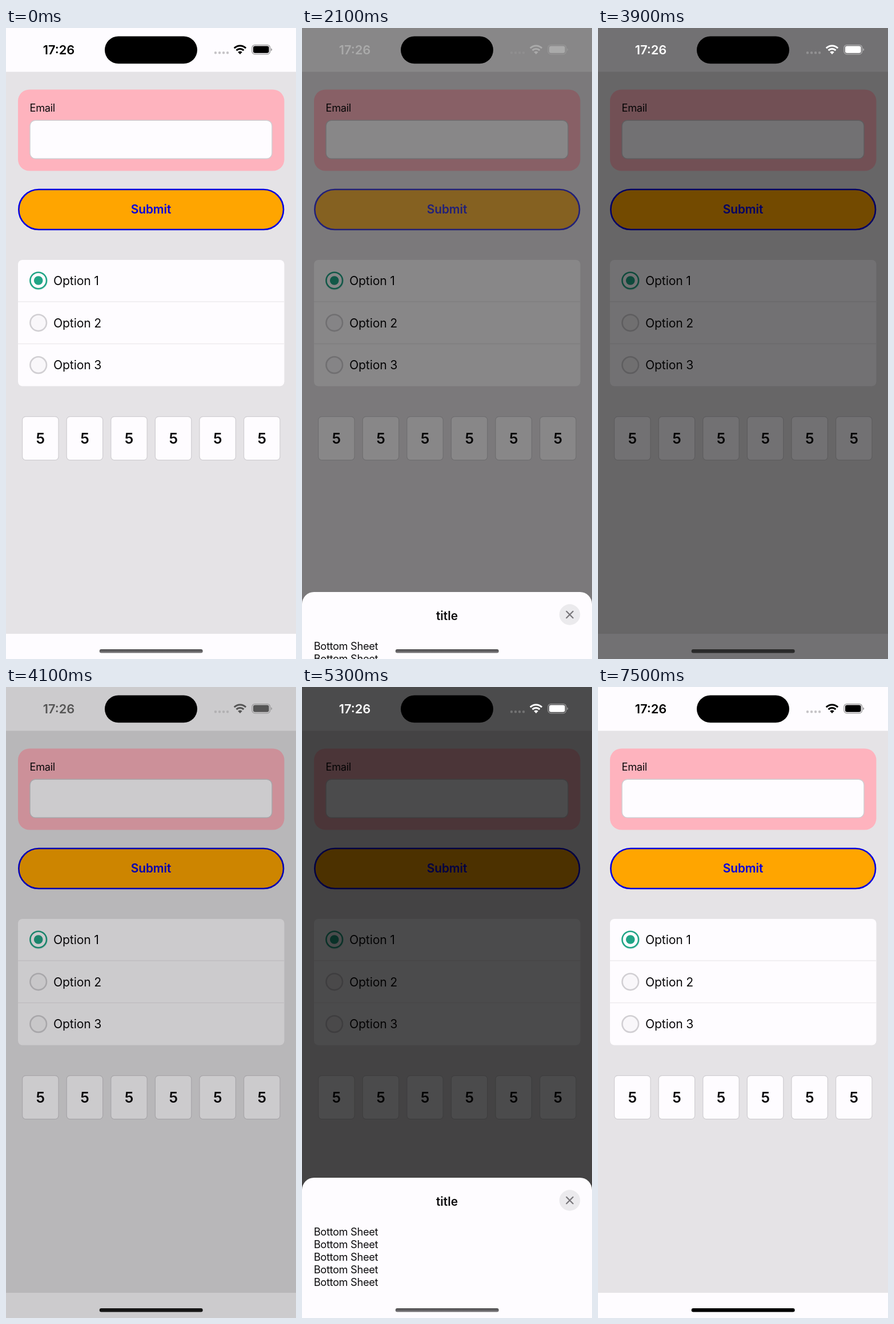
Write an HTML page that moves like this. It is 508x1102 px and loops after 7600 ms.

```html
<!DOCTYPE html>
<html lang="en">
<head>
<meta charset="utf-8">
<style>
html, body { margin: 0; width: 100%; height: 100%; overflow: hidden; background: #e5e3e6; }
svg { display: block; width: 100vw; height: 100vh; }
text { font-family: Inter, "Open Sans", sans-serif; fill: #0b0a0c; }
.small { font-size: 18.2px; letter-spacing: -.3px; }
.option { font-size: 21.2px; letter-spacing: -.15px; }
.bold { font-weight: 600; text-anchor: middle; }
.paper { fill: #fefcff; }
</style>
</head>
<body>
<svg viewBox="0 0 508 1102">
  <defs>
    <linearGradient id="grip" x2="0" y2="1">
      <stop stop-color="#4a494b"/><stop offset="1" stop-color="#7d7b7e"/>
    </linearGradient>
  </defs>

  <rect width="508" height="1102" fill="#e5e3e6"/>
  <rect class="paper" width="508" height="76.5"/>
  <rect class="paper" y="1058" width="508" height="44"/>

  <rect x="21" y="107.5" width="466.5" height="142" rx="20" fill="#feb3be"/>
  <text class="small" x="41.5" y="145.5">Email</text>
  <rect class="paper" x="42" y="161.3" width="424" height="67" rx="9.5" stroke="#cfcdd1" stroke-width="1.4"/>

  <g id="submit">
    <rect x="22.3" y="282" width="463.8" height="70" rx="35" fill="#ffa500" stroke="#0400e0" stroke-width="2.6"/>
    <text class="bold" x="254" y="324.3" font-size="20.8" style="fill:#0400e0">Submit</text>
  </g>

  <rect class="paper" x="21" y="405" width="466.5" height="220.5" rx="8"/>
  <path d="M21 478H487.5M21 551.5H487.5" stroke="#edebee" stroke-width="1.3"/>
  <g id="options"></g>
  <g id="digits"></g>

  <rect id="shade" width="508" height="1102"/>

  <g id="sheet">
    <path class="paper" d="M0 1140V878A21 21 0 0 1 21 857H487A21 21 0 0 1 508 878V1140Z"/>
    <text class="bold" x="254" y="905.7" font-size="20.8">title</text>
    <circle cx="469" cy="896.5" r="18.2" fill="#ebeaed"/>
    <path d="M463.3 890.8L474.7 902.2M474.7 890.8L463.3 902.2" stroke="#777579" stroke-width="2.2" stroke-linecap="round"/>
    <g id="lines"></g>
  </g>

  <g id="status">
    <text class="bold" x="92.5" y="45.7" font-size="21.8" style="fill:inherit">17:26</text>
    <path d="M367 43.3h.01M374.1 43.3h.01M381.1 43.3h.01M388.1 43.3h.01" stroke-width="4.4" stroke-linecap="round" opacity=".22"/>
    <path d="M399.8 35.3A14.4 14.4 0 0 1 420.2 35.3M403.6 39.1A9 9 0 0 1 416.4 39.1" fill="none" stroke-width="3"/>
    <path d="M410 46L406.2 42.1A5.4 5.4 0 0 1 413.8 42.1Z" stroke="none"/>
    <rect x="431" y="29.6" width="31.6" height="16.2" rx="5" fill="none" stroke-width="1.3" opacity=".42"/>
    <rect x="433" y="31.6" width="27.6" height="12.2" rx="3.3" stroke="none"/>
    <path d="M464.2 35.2Q466.2 36 466.2 37.7T464.2 40.2Z" stroke="none" opacity=".42"/>
  </g>
  <rect x="173" y="14.5" width="162" height="47.7" rx="23.8"/>
  <rect id="home" x="163.7" y="1085" width="181" height="6.5" rx="3.2"/>
</svg>
<script>
const $ = id => document.getElementById(id);
const list = (n, draw) => Array.from({ length: n }, (_, i) => draw(i)).join('');
const clamp = x => Math.min(1, Math.max(0, x));
const ramp = (t, from, to) => clamp((t - from) / (to - from));
const easeOut = x => 1 - (1 - x) ** 3;

$('options').innerHTML = list(3, i => {
  const y = 441 + 73.8 * i, on = i === 0;
  return (on ? `<circle cx="57" cy="${y + 1}" r="16" fill="#22a585" opacity=".15"/>` : '') +
    `<circle cx="56.7" cy="${y}" r="14.3" fill="${on ? '#fefcff' : '#f9f7fa'}"
      stroke="${on ? '#21a586' : '#d1cfd3'}" stroke-width="2.6"/>` +
    (on ? `<circle cx="56.7" cy="${y}" r="7.8" fill="#21a586"/>` : '') +
    `<text class="option" x="83" y="${y + 7.8}">Option ${i + 1}</text>`;
});
$('digits').innerHTML = list(6, i => {
  const x = 28.6 + 77.6 * i;
  return `<rect class="paper" x="${x}" y="678.6" width="63.4" height="76" rx="6" stroke="#cfcdd1" stroke-width="1.2"/>
    <text class="bold" x="${x + 31.8}" y="726" font-size="25.5">5</text>`;
});
$('lines').innerHTML = list(5, i => `<text class="small" x="20.7" y="${957.7 + 22 * i}">Bottom Sheet</text>`);

// Each cycle: press the button, raise the sheet, then drop it and fade the shade.
const cycles = [
  { press: 1800, full: 1900, open: 2000, close: 3900 },
  { press: 4600, full: 4800, open: 4900, close: 7100 }
];

function render(t) {
  const c = cycles[t < 4500 ? 0 : 1];
  const closing = t >= c.close;
  const age = t - c.close;
  const span = c === cycles[0] ? 500 : 400;
  const opened = ramp(t, c.open - 100, c.open + 200);
  const shade = closing ? .55 * (1 - ramp(age, 0, 400)) ** 1.5 : .7 * opened;
  const rise = closing ? 0 : easeOut(ramp(t, c.open, c.open + span));
  const pressed = ramp(t, c.press, c.full) * (1 - ramp(t, c.open - 100, c.open + 200));
  const light = closing ? 1 - ramp(age, 0, 300) : opened;

  $('submit').setAttribute('opacity', 1 - .8 * pressed);
  $('shade').setAttribute('opacity', shade);
  $('sheet').setAttribute('transform', `translate(0 ${(1 - rise) * 250})`);
  const tone = Math.round(255 * light);
  $('status').setAttribute('fill', `rgb(${tone},${tone},${tone})`);
  $('status').setAttribute('stroke', `rgb(${tone},${tone},${tone})`);
  document.querySelector('#status text').setAttribute('stroke', 'none');
  const dark = Math.round(42 * (1 - ramp(age, 0, 400)));
  $('home').setAttribute('fill', closing && age < 500 ? `rgb(${dark},${dark},${dark})` : 'url(#grip)');
}

function tick(now) {
  render(Math.floor(now % 7600 / 100) * 100);
  requestAnimationFrame(tick);
}
render(0);
requestAnimationFrame(tick);
</script>
</body>
</html>
```
